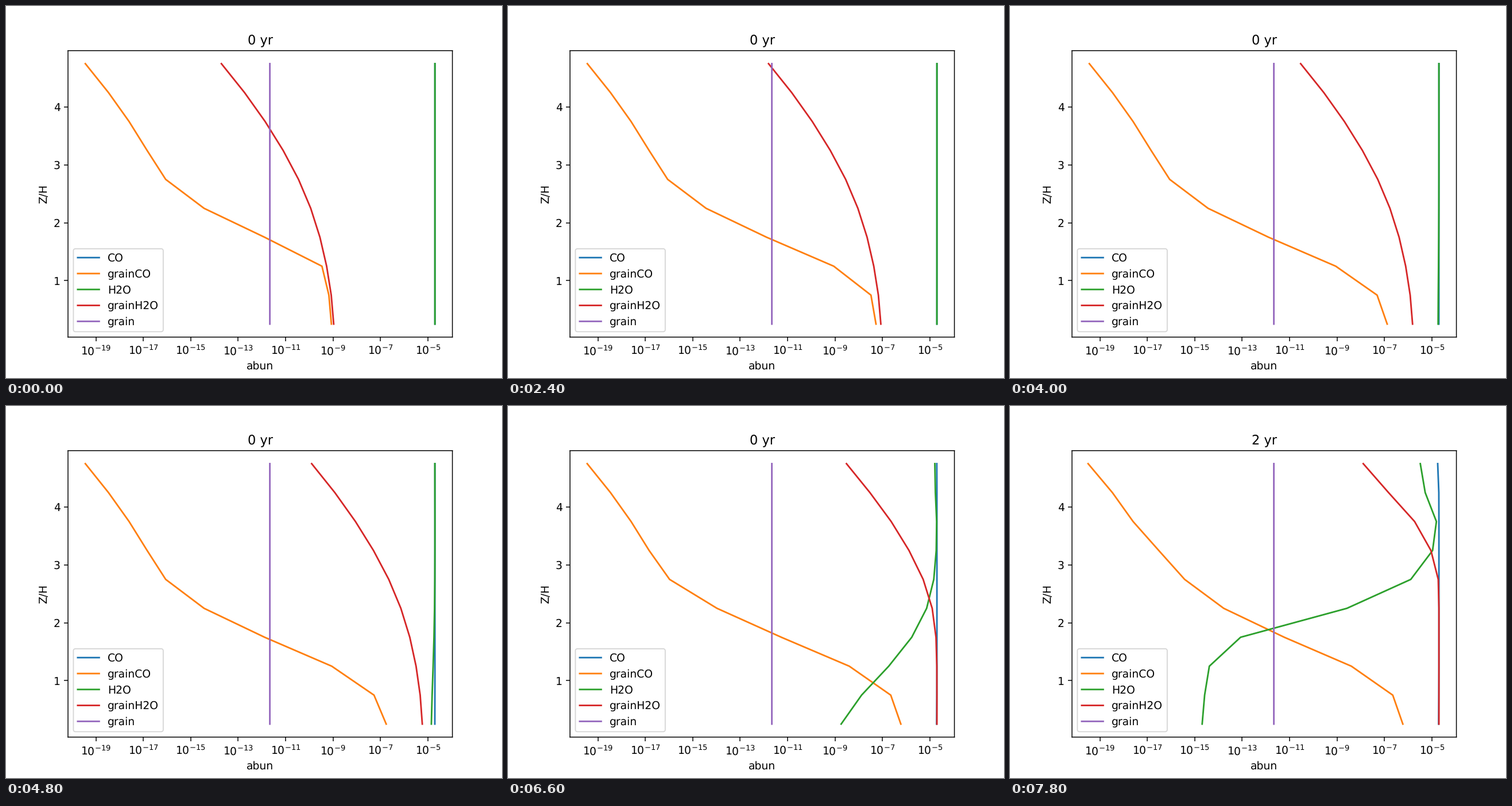
These frames come from a looping animation (864 by 648 pixels, 8000 ms). A matplotlib script:

```python
import numpy as np
import matplotlib.pyplot as plt
from matplotlib.animation import FuncAnimation
from matplotlib.ticker import NullLocator

plt.rcParams["path.snap"] = False
plt.rcParams["text.hinting"] = "none"

FRAMES = 40
LOG_STEP = 10 / 63      # decades of time per frame
T0 = 1e-6               # years
T_END = T0 * 10 ** (LOG_STEP * (FRAMES - 1))
TOTAL = 2e-5            # gas + ice abundance of each molecule
GRAIN = 2.18e-12
LAYERS = 4.57           # ice layers once all water is frozen out

# Disk structure: Gaussian density, temperature doubling above Z/H = 3
z = np.arange(0.25, 5, 0.5)
density = np.exp(-z**2 / 2)
temp = 1 + 0.98 * np.sin(np.pi / 2 * np.minimum(z / 3, 1)) ** 4

# Freeze-out rates per year
flux = density * np.sqrt(temp)
freeze = 10**-4.256 / T0 * flux
freeze_co = freeze * np.sqrt(18 / 28)

# Balance of freeze-out and desorption: water vapour floor, CO ice ceiling
vapour = (1e-10 + 10 ** (3.93 - 18 / temp)) / flux
ceiling = flux * 10 ** (15.82 / temp - 17.984)


def uv_rate(dose, depth):
    """Photodissociation rate, shielded by the gas."""
    return dose / T_END * np.exp(-depth * density)


photo = uv_rate(1.88, 2950)
photo_co = uv_rate(0.16, 23000)
photo_ice = 0.08 * photo


def abundances(t):
    loss = freeze + photo
    gas = np.exp(-loss * t) - vapour * np.expm1(-freeze * t)
    ice = freeze * (np.exp(-photo_ice * t) - np.exp(-loss * t)) / (loss - photo_ice)
    co = np.exp(-photo_co * t)
    cap = ceiling * np.maximum(1, LAYERS * ice)
    co_ice = co * cap * -np.expm1(-freeze_co * t / cap)
    return [TOTAL * a for a in (co - co_ice, co_ice, gas, ice)]


fig, ax = plt.subplots(figsize=(6.4, 4.8), dpi=135)
ax.set_xscale("log")
ax.set_xlim(10**-20.175, 10**-3.962)
ax.set_ylim(0.025, 4.975)
ax.set_xticks([10.0**p for p in range(-19, -4, 2)])
ax.xaxis.set_minor_locator(NullLocator())
ax.set_yticks(range(1, 5))
ax.set_xlabel("abun")
ax.set_ylabel("Z/H")
title = ax.set_title("0 yr")

lines = [ax.plot(x, z, label=name)[0]
         for x, name in zip(abundances(T0), ("CO", "grainCO", "H2O", "grainH2O"))]
ax.plot(np.full_like(z, GRAIN), z, label="grain")
ax.legend(loc="lower left")


def update(i):
    t = T0 * 10 ** (LOG_STEP * i)
    for line, x in zip(lines, abundances(t)):
        line.set_xdata(x)
    title.set_text(f"{t:.0f} yr")
    return [*lines, title]


anim = FuncAnimation(fig, update, frames=FRAMES, interval=200, repeat=True)
plt.show()
```
